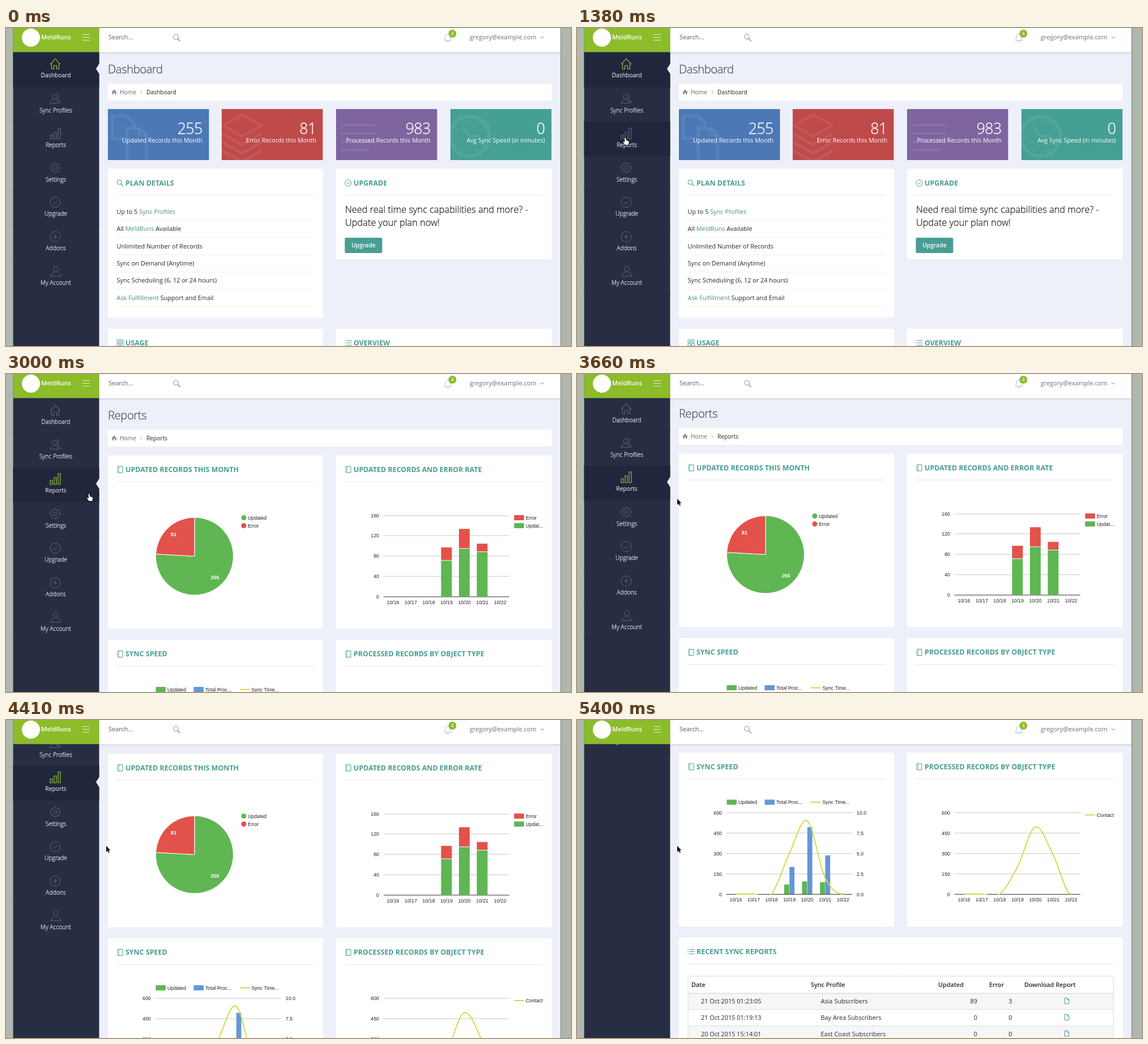
An HTML page with a canvas for the animation above (5430 ms loop, 998x561 px).

```html
<!DOCTYPE html>
<html lang="en">
<head>
<meta charset="utf-8">
<title>Dashboard tour</title>
<style>
html, body { margin: 0; width: 100%; height: 100%; overflow: hidden; background: #b0b8ae; }
canvas { display: block; }
</style>
</head>
<body>
<canvas id="stage" width="998" height="561"></canvas>
<script>
const g = document.getElementById('stage').getContext('2d');
const LOOP = 5430, TICK = 30, SWITCH = 1500;
const SANS = '"Open Sans", sans-serif', ARIAL = '"Liberation Sans", Arial, sans-serif';
const TEAL = '#479d91', GREEN = '#8cbc2a', INK = '#25282c', PAGE = '#edf0f8';
const C_GREEN = '#5fb653', C_RED = '#e2524b', C_BLUE = '#6497d8', C_LINE = '#d3d84c';

// Key points: [time, ...values]
const CURSOR = [[150, -14, 250], [620, 85, 193], [2600, 85, 193], [3250, 177, 220], [3660, 177, 220], [4000, 177, 222]];
const SCROLL = [[3600, 0], [3660, 3], [4000, 30], [4290, 34], [4410, 84], [4530, 270], [4680, 349], [5130, 349], [5400, 411.5]];

function track(keys, t, ease = u => u) {
  if (t <= keys[0][0]) return keys[0].slice(1);
  for (let i = 1; i < keys.length; i++) {
    const [a, ...from] = keys[i - 1], [b, ...to] = keys[i];
    if (t < b) return from.map((v, k) => v + (to[k] - v) * ease((t - a) / (b - a)));
  }
  return keys[keys.length - 1].slice(1);
}
const smooth = u => u * u * (3 - 2 * u);

function box(x, y, w, h, color) {
  g.fillStyle = color;
  g.fillRect(x, y, w, h);
}

// y is the middle of the capitals; light text gets a hairline to thicken it
function text(str, x, y, size, color = INK, o = {}) {
  const base = y + size * 0.357;
  g.font = `${o.weight || 400} ${size}px ${o.font || SANS}`;
  g.textAlign = o.align || 'left';
  g.letterSpacing = (o.gap || 0) + 'px';
  g.fillStyle = color;
  g.fillText(str, x, base);
  if (o.weight === 300) {
    g.strokeStyle = color;
    g.lineWidth = 0.3;
    g.strokeText(str, x, base);
  }
  const w = g.measureText(str).width;
  g.letterSpacing = '0px';
  return x + w;
}
const label = (str, x, y, align = 'left', color = '#222', weight = 400) =>
  text(str, x, y, 8.8, color, { font: ARIAL, align, weight });

function line(color, w, pts, close) {
  g.beginPath();
  for (let i = 0; i < pts.length; i += 2) g.lineTo(pts[i], pts[i + 1]);
  if (close) g.closePath();
  g.strokeStyle = color;
  g.lineWidth = w;
  g.stroke();
}
function ring(color, w, x, y, r) {
  g.beginPath();
  g.arc(x, y, r, 0, 7);
  g.strokeStyle = color;
  g.lineWidth = w;
  g.stroke();
}
function disc(color, x, y, r) {
  g.beginPath();
  g.arc(x, y, r, 0, 7);
  g.fillStyle = color;
  g.fill();
}
const frame = (color, w, x, y, bw, bh) => line(color, w, [x, y, x + bw, y, x + bw, y + bh, x, y + bh], true);
function at(x, y, draw) {
  g.save();
  g.translate(x, y);
  draw();
  g.restore();
}

function person(c, x, s) {
  g.beginPath();
  g.ellipse(x, -4 * s, 4 * s, 5 * s, 0, 0.8, Math.PI * 2 + 0.8);
  g.moveTo(x - 2.5 * s, 0);
  g.bezierCurveTo(x - 2 * s, 4 * s, x - 9 * s, 3 * s, x - 9 * s, 9 * s);
  g.lineTo(x + 9 * s, 9 * s);
  g.bezierCurveTo(x + 9 * s, 3 * s, x + 2 * s, 4 * s, x + 2.5 * s, 0);
  g.strokeStyle = c;
  g.lineWidth = 1;
  g.stroke();
}
function gear(c) {
  g.beginPath();
  for (let i = 0; i < 32; i++) {
    const a = (i - 0.5) * Math.PI / 16, r = i % 4 < 2 ? 9.2 : 7;
    g.lineTo(r * Math.cos(a), r * Math.sin(a));
  }
  g.closePath();
  g.strokeStyle = c;
  g.lineWidth = 1;
  g.stroke();
  ring(c, 1, 0, 0, 3);
}
function check(c, r) {
  ring(c, 1, 0, 0, r);
  line(c, 1, [-r * 0.45, 0, -r * 0.1, r * 0.35, r * 0.5, -r * 0.35]);
}
const MENU = [
  ['Dashboard', c => {
    line(c, 1.1, [-9, 1, 0, -9, 9, 1]);
    line(c, 1.1, [-6.5, -1, -6.5, 9, -2.5, 9, -2.5, 3, 2.5, 3, 2.5, 9, 6.5, 9, 6.5, -1]);
  }],
  ['Sync Profiles', c => { person(c, -1.5, 0.85); line(c, 1, [2, -9, 5, -8, 6, -4, 4, 0, 5, 3, 9, 5, 9, 8]); }],
  ['Reports', c => [[-9, 3], [-2, -2], [5, -9]].forEach(([x, y]) => frame(c, 1.1, x, y, 4, 10 - y))],
  ['Settings', gear],
  ['Upgrade', c => check(c, 9)],
  ['Addons', c => { ring(c, 1, 0, 0, 9); line(c, 1, [-4, 0, 4, 0]); line(c, 1, [0, -4, 0, 4]); }],
  ['My Account', c => person(c, 1, 1)]
];

function sidebar(active, mouse, top) {
  box(12.5, 0, 152, 561, '#272d43');
  MENU.forEach(([name, icon], i) => {
    const y = 43.5 + 60.8 * i - top, on = i === active;
    const hover = mouse[0] > 13 && mouse[0] < 164 && mouse[1] >= y && mouse[1] < y + 60.8;
    if (on || hover) box(12.5, y, 152, 60.8, '#20273c');
    box(12.5, y + 60.3, 152, 1, '#23293e');
    const lift = on ? 1 : 0;
    at(87, y + 20.7 - lift, () => icon(on ? '#9ccb35' : '#5d6678'));
    text(name, 88, y + 41 - lift, 10.3, on ? '#fff' : '#d3d8e3', { weight: on ? 400 : 300, align: 'center' });
    if (on) {
      g.fillStyle = PAGE;
      g.beginPath();
      g.moveTo(165, y + 19); g.lineTo(159, y + 28.5); g.lineTo(165, y + 38);
      g.fill();
    }
  });
}

function magnifier(c, x, y, r) {
  ring(c, 1, x, y, r);
  line(c, 1.2, [x + r * 0.7, y + r * 0.7, x + r * 1.8, y + r * 1.8]);
}

function header() {
  const shade = g.createLinearGradient(0, 42.5, 0, 47);
  shade.addColorStop(0, 'rgba(90,100,120,.2)');
  shade.addColorStop(1, 'rgba(90,100,120,0)');
  box(165, 42.5, 814, 4.5, shade);
  box(164.5, 0, 814.5, 42.5, '#fff');
  box(12.5, 0, 152, 42.5, GREEN);
  disc('#fff', 44, 17, 16);
  text('MeldRuns', 62, 16.5, 11, '#fff', { weight: 600 });
  for (const y of [11.5, 16.5, 21.5]) box(135, y - 0.5, 13, 1, '#e3efc4');
  text('Search...', 181, 16.5, 11, '#555d69');
  magnifier('#808894', 300, 15.5, 4.3);
  g.beginPath();
  g.moveTo(774, 22);
  g.bezierCurveTo(778, 18, 774, 11, 780.5, 10.5);
  g.bezierCurveTo(787, 11, 783, 18, 787, 22);
  g.closePath();
  g.strokeStyle = '#b4bcc8';
  g.lineWidth = 1;
  g.stroke();
  line('#b4bcc8', 1, [778.5, 22, 779.5, 24.5, 781.5, 24.5, 782.5, 22]);
  disc(GREEN, 788.5, 10, 7);
  text('4', 788.5, 10, 8.5, '#fff', { align: 'center' });
  text('gregory@example.com', 819, 16.5, 11, '#666f7c');
  line('#7d8590', 1, [944, 15, 947, 18, 950, 15]);
}

function pageHead(name) {
  text(name, 180, 73, 20.2, '#4f545c', { weight: 300, gap: -0.4 });
  box(180, 98, 784, 30, '#fff');
  g.fillStyle = '#8b8f96';
  g.beginPath();
  for (const [x, y] of [[186, 113.5], [191, 108.5], [196, 113.5], [194.5, 113.5], [194.5, 117], [192, 117], [192, 114], [190, 114], [190, 117], [187.5, 117], [187.5, 113.5]]) g.lineTo(x, y);
  g.fill();
  text('Home', 201, 113.5, 10.25, '#62666d');
  line('#a0a4aa', 1, [237.5, 110.5, 240.5, 113.5, 237.5, 116.5]);
  text(name, 248, 113.5, 10.25);
}

function book(x, y) {
  frame(TEAL, 1, x - 4, y - 5.5, 8.5, 11);
  line(TEAL, 0.6, [x - 2, y - 5.5, x - 2, y + 5.5]);
}
function listIcon(x, y) {
  for (const d of [-4, 0, 4]) {
    box(x - 6, y + d - 0.5, 1.5, 1.2, TEAL);
    box(x - 3, y + d - 0.5, 9, 1, TEAL);
  }
}
function tiles(x, y) {
  for (const i of [0, 1, 2, 3]) frame(TEAL, 1, x - 5.5 + (i % 2) * 6.5, y - 5.5 + (i >> 1) * 6.5, 4.5, 4.5);
}
function panel(x, y, w, h, title, icon) {
  box(x, y, w, h, '#fff');
  icon(x + 21.5, y + 25);
  text(title, x + 31, y + 25, 12.45, TEAL, { weight: 700 });
  box(x + 15.5, y + 46, w - 32, 1, '#e3e6ea');
}

const MARK = 'rgba(255,255,255,.07)';
const STATS = [
  [180, '#4c79b6', '255', 'Updated Records this Month', () => {
    line(MARK, 5, [29, 52, 8, 52, 8, 12, 32, 12, 46, 24, 46, 32]);
    line(MARK, 5, [34, 90, 34, 34, 56, 34, 68, 46, 68, 90]);
    line(MARK, 4, [55, 34, 55, 47, 68, 47]);
  }],
  [381, '#bf4a4a', '81', 'Error Records this Month', () => {
    line(MARK, 4, [2, 29, 36, 10, 70, 29, 36, 48], true);
    for (const y of [44, 59, 74]) line(MARK, 5, [2, y, 36, y + 19, 70, y]);
  }],
  [583, '#7e659f', '983', 'Processed Records this Month', () => {
    for (const y of [28, 43, 58, 72]) line(MARK, 4, [9, y, y % 3 ? 70 : 58, y]);
  }],
  [785, '#459f94', '0', 'Avg Sync Speed (in minutes)', () => {
    ring(MARK, 6, 34, 48, 35);
    line(MARK, 5, [21, 32, 34, 48, 52, 48]);
    for (let a = 0; a < 6.2; a += Math.PI / 6)
      line(MARK, 3, [34 + 26 * Math.cos(a), 48 + 26 * Math.sin(a), 34 + 31 * Math.cos(a), 48 + 31 * Math.sin(a)]);
  }]
];
const PLAN = [
  ['Up to 5 ', '*Sync Profiles'], ['All ', '*MeldRuns', ' Available'], ['Unlimited Number of Records'],
  ['Sync on Demand (Anytime)'], ['Sync Scheduling (6, 12 or 24 hours)'], ['*Ask Fulfillment', ' Support and Email']
];

function dashboard() {
  pageHead('Dashboard');
  for (const [x, color, num, name, mark] of STATS) {
    g.save();
    g.beginPath();
    g.rect(x, 143, 178.5, 90);
    g.clip();
    box(x, 143, 179, 90, color);
    at(x, 143, mark);
    g.restore();
    text(num, x + 166.5, 177.5, 27, '#fff', { weight: 300, gap: -0.8, align: 'right' });
    text(name, x + 167, 198.5, 10.65, '#fff', { align: 'right' });
  }
  panel(180, 248.5, 380, 262.5, 'PLAN DETAILS', (x, y) => magnifier(TEAL, x - 1.5, y - 1.5, 4));
  PLAN.forEach((parts, i) => {
    const y = 324 + 30.4 * i;
    let x = 195.5;
    for (const p of parts) x = p[0] === '*' ? text(p.slice(1), x, y, 10.9, '#4a8f7c') : text(p, x, y, 10.9);
    box(195.5, y + 15, 348, 1, '#eef0f2');
  });
  panel(583, 248.5, 381, 159.5, 'UPGRADE', (x, y) => at(x, y, () => check(TEAL, 5.5)));
  text('Need real time sync capabilities and more? -', 599, 320.5, 16.4, INK, { weight: 300 });
  text('Update your plan now!', 599, 343, 16.4, INK, { weight: 300 });
  g.beginPath();
  g.roundRect(598.5, 370, 66, 27, 2);
  g.fillStyle = '#479e94';
  g.fill();
  text('Upgrade', 631.5, 383.5, 10.4, '#fff', { weight: 600, align: 'center' });
  panel(180, 530.5, 380, 90, 'USAGE', tiles);
  panel(583, 530.5, 381, 90, 'OVERVIEW', listIcon);
}

const STEP = 31.55, RISE = 143.5;
// Grid with value labels and a date axis; y is the zero line
function axes(x, y, max, right) {
  for (let i = 0; i <= 4; i++) {
    const gy = Math.round(y - RISE * i / 4);
    box(x, gy - 0.5, 222, 1, i ? '#c8c8c8' : '#333');
    label(String(max * i / 4), x - 8, gy, 'right');
    if (right) label((2.5 * i).toFixed(1), x + 230, gy);
  }
  for (let i = 0; i < 7; i++) label('10/' + (16 + i), x + 16.5 + STEP * i, y + 10, 'center');
}
function curve(x, y, max, vals) {
  const px = i => x + 16.5 + STEP * i;
  const v = i => vals[Math.max(0, Math.min(6, i))] * RISE / max;
  const slope = i => i === 0 || i === 6 ? 0 : (v(i + 1) - v(i - 1)) / 6;
  g.save();
  g.beginPath();
  g.rect(x, y - RISE - 2, 222, RISE + 3);
  g.clip();
  g.beginPath();
  g.moveTo(px(0), y - v(0));
  for (let i = 0; i < 6; i++)
    g.bezierCurveTo(px(i) + STEP / 3, y - v(i) - slope(i), px(i + 1) - STEP / 3, y - v(i + 1) + slope(i + 1), px(i + 1), y - v(i + 1));
  g.strokeStyle = C_LINE;
  g.lineWidth = 1.9;
  g.stroke();
  g.restore();
}
function key(x, y, color, name, thin) {
  box(x, y - (thin ? 1 : 4.5), 17.5, thin ? 2 : 9, color);
  label(name, x + 20.4, y);
}

function pie(x, y, r) {
  const cut = -Math.PI / 2 + 2 * Math.PI * 255 / 336;
  for (const [a, b, color] of [[-Math.PI / 2, cut, C_GREEN], [cut, Math.PI * 1.5, C_RED]]) {
    g.beginPath();
    g.moveTo(x, y);
    g.arc(x, y, r, a, b);
    g.closePath();
    g.fillStyle = color;
    g.fill();
    g.strokeStyle = '#fff';
    g.lineWidth = 1;
    g.stroke();
  }
  label('81', x - 37, y - 38.5, 'center', '#fff', 700);
  label('255', x + 36, y + 37.5, 'center', '#fff', 700);
  disc(C_GREEN, x + 87, y - 68, 4.5);
  label('Updated', x + 94, y - 68);
  disc(C_RED, x + 87, y - 54, 4.5);
  label('Error', x + 94, y - 54);
}

function stacked() {
  axes(667, 393, 160);
  [[71, 26], [94.5, 39], [88, 16.5]].forEach(([ok, bad], i) => {
    const x = 768.5 + STEP * i, k = RISE / 160;
    box(x, 393 - ok * k, 19, ok * k - 0.5, C_GREEN);
    box(x, 393 - (ok + bad) * k, 19, bad * k - 1, C_RED);
  });
  key(897.5, 253.5, C_RED, 'Error');
  key(897.5, 267.5, C_GREEN, 'Updat...');
}

function speed() {
  const y = 718.5;
  key(264.5, 556.5, C_GREEN, 'Updated');
  key(331.5, 556.5, C_BLUE, 'Total Proc...');
  key(413, 556.5, C_LINE, 'Sync Time...', true);
  axes(264, y, 600, true);
  [[70, 200], [93, 493], [87, 285]].forEach(([ok, all], i) => {
    const x = 366 + STEP * i, k = RISE / 600;
    box(x, y - ok * k, 8.8, ok * k, C_GREEN);
    box(x + 9.3, y - all * k, 8.8, all * k, C_BLUE);
  });
  curve(264, y, 10, [0, 0, 0, 5, 9, 2, 0]);
}

function table() {
  const top = 863.5, cols = [202, 413, 638, 728, 790];
  ['Date', 'Sync Profile', 'Updated', 'Error', 'Download Report'].forEach((s, i) =>
    text(s, cols[i], top + 15, 10.8, INK, { weight: 600 }));
  const rows = [
    ['21 Oct 2015 01:23:05', 'Asia Subscribers', '89', '3'],
    ['21 Oct 2015 01:19:13', 'Bay Area Subscribers', '0', '0'],
    ['20 Oct 2015 15:14:01', 'East Coast Subscribers', '0', '0']
  ];
  rows.forEach(([date, name, ok, bad], i) => {
    const y = top + 30 + 28.8 * i, mid = y + 14.5;
    if (i % 2 === 0) box(196, y, 752, 28.8, '#f6f6f6');
    box(196, y - 0.5, 752, i ? 1 : 1.6, '#dcdcdc');
    text(date, 219, mid, 10.9);
    text(name, 430.5, mid, 10.9);
    text(ok, 707, mid, 10.9, INK, { align: 'right' });
    text(bad, 768.5, mid, 10.9, INK, { align: 'right' });
    line(TEAL, 1, [861.5, mid - 6, 866, mid - 6, 869, mid - 3, 869, mid + 4, 861.5, mid + 4], true);
    line(TEAL, 1, [866, mid - 6, 866, mid - 3, 869, mid - 3]);
  });
  frame('#dcdcdc', 1, 196, top, 751.5, 140);
}

function reports() {
  pageHead('Reports');
  panel(180, 143.5, 380, 306, 'UPDATED RECORDS THIS MONTH', book);
  panel(583, 143.5, 381, 306, 'UPDATED RECORDS AND ERROR RATE', book);
  pie(333, 321.5, 68.5);
  stacked();
  panel(180, 469, 380, 307, 'SYNC SPEED', book);
  panel(583, 469, 381, 307, 'PROCESSED RECORDS BY OBJECT TYPE', book);
  speed();
  axes(667, 718.5, 600);
  curve(667, 718.5, 600, [0, 0, 0, 200, 495, 287, 0]);
  key(897.5, 579, C_LINE, 'Contact', true);
  panel(180, 795, 784, 300, 'RECENT SYNC REPORTS', listIcon);
  table();
}

function shape(d, fill, stroke, w) {
  const p = new Path2D(d);
  g.lineJoin = 'round';
  g.strokeStyle = stroke;
  g.lineWidth = w;
  g.stroke(p);
  g.fillStyle = fill;
  g.fill(p);
  g.lineJoin = 'miter';
}
function pointer([x, y]) {
  at(x, y, () => {
    if (x > 13 && x < 164)
      shape('M-1 1Q0 0 1 1L1.5 5L6 6.5Q7 7 6.5 9L5.5 13H0L-3.5 8.5Q-3.5 7 -2 7.5L-.5 8.5Z', '#fff', '#111', 1.6);
    else
      shape('M0 0V11L2.5 8.7L4.3 12.6L6 11.8L4.3 8H7.5Z', '#111', '#fff', 1.6);
  });
}

function draw(t) {
  const mouse = track(CURSOR, t, smooth), top = track(SCROLL, t)[0], late = t >= SWITCH;
  box(0, 0, 998, 561, '#b0b8ae');
  box(12.5, 0, 966.5, 561, PAGE);
  at(0, -top, late ? reports : dashboard);
  sidebar(late ? 2 : 0, mouse, top);
  header();
  const edge = g.createLinearGradient(979, 0, 984, 0);
  edge.addColorStop(0, 'rgba(80,90,85,.2)');
  edge.addColorStop(1, 'rgba(80,90,85,0)');
  box(979, 0, 5, 561, edge);
  pointer(mouse);
}

const start = performance.now();
function tick() {
  const t = (performance.now() - start) % LOOP;
  draw(Math.floor((t + 2) / TICK) * TICK % LOOP);
  requestAnimationFrame(tick);
}
tick();
</script>
</body>
</html>
```
